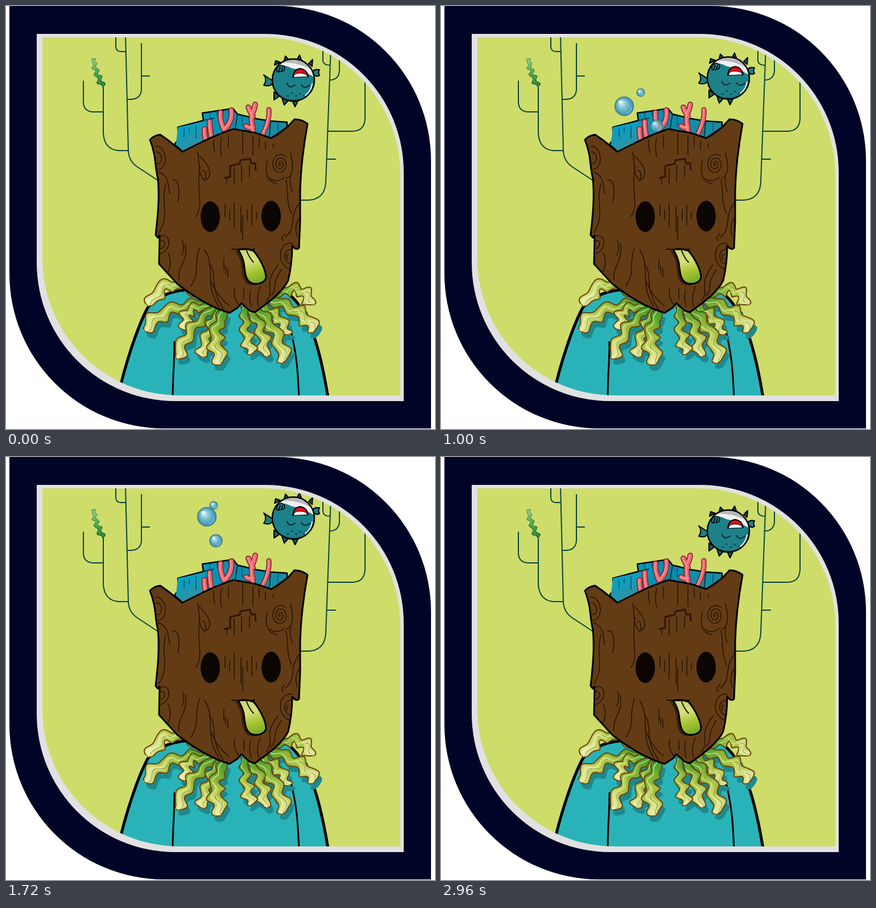
Animation, 754 px wide and 743 px high, one loop 3000 ms. Source, as an HTML page with a canvas:

```html
<!DOCTYPE html>
<html lang="en">
<head>
<meta charset="utf-8">
<title>Bark head and puffer fish</title>
<style>
html, body { margin: 0; width: 100%; height: 100%; overflow: hidden; background: #fff; }
canvas { display: block; }
</style>
</head>
<body>
<canvas id="stage" width="754" height="743"></canvas>
<script>
const stage = document.getElementById('stage');
let c = stage.getContext('2d');
const LOOP = 3000, STEP = 40;

function shape(d, fill, line, width = 1.5) {
  const p = typeof d === 'string' ? new Path2D(d) : d;
  if (fill) { c.fillStyle = fill; c.fill(p); }
  if (line) { c.strokeStyle = line; c.lineWidth = width; c.stroke(p); }
}

function oval(x, y, rx, ry, fill, line, width) {
  const p = new Path2D();
  p.ellipse(x, y, rx, ry, 0, 0, 7);
  shape(p, fill, line, width);
}

function ramp(x0, y0, x1, y1, ...colors) {
  const g = c.createLinearGradient(x0, y0, x1, y1);
  colors.forEach((k, i) => g.addColorStop(i / (colors.length - 1), k));
  return g;
}

function leafBox(x, y, w, h, r) {
  const p = new Path2D();
  p.roundRect(x, y, w, h, [0, r, 0, r]);
  return p;
}
const inner = leafBox(64, 55, 629, 629, 241);

// A wavy ribbon along a quadratic curve, widening to a round tip.
function ribbon([x0, y0, cx, cy, x1, y1, w], phase, scale = 1, amp = 4.5, waves = 3.4) {
  const left = [], right = [], n = 60;
  for (let i = 0; i <= n; i++) {
    const u = i / n, v = 1 - u;
    const dx = v * (cx - x0) + u * (x1 - cx), dy = v * (cy - y0) + u * (y1 - cy);
    const len = Math.hypot(dx, dy), nx = -dy / len, ny = dx / len;
    const a = waves * 2 * Math.PI * u + phase;
    const wave = amp * Math.sin(a) * Math.min(1, u * 3);
    const cap = u > .88 ? Math.sqrt(Math.max(0, 1 - ((u - .88) / .12) ** 2)) : 1;
    const h = w / 2 * scale * (.6 + .4 * u + .12 * Math.cos(a * 1.5)) * cap;
    const x = v * v * x0 + 2 * u * v * cx + u * u * x1;
    const y = v * v * y0 + 2 * u * v * cy + u * u * y1;
    left.push([x + nx * (wave + h), y + ny * (wave + h)]);
    right.unshift([x + nx * (wave - h), y + ny * (wave - h)]);
  }
  return new Path2D('M' + left.concat(right).join('L') + 'Z');
}

const strands = [
  [360, 522, 282, 452, 253, 528, 23], [470, 510, 520, 478, 538, 526, 21],
  [360, 525, 280, 520, 243, 570, 24], [455, 515, 520, 528, 543, 571, 24],
  [360, 528, 305, 525, 318, 568, 20], [440, 525, 485, 540, 493, 578, 21],
  [370, 530, 318, 560, 301, 620, 21], [435, 528, 482, 565, 489, 627, 23],
  [375, 535, 352, 570, 346, 617, 22], [425, 530, 456, 565, 454, 616, 21],
  [420, 528, 418, 575, 432, 611, 20], [385, 535, 355, 580, 380, 628, 27]
];

function collar() {
  strands.forEach((s, i) => {
    c.save();
    c.translate(5, 10);
    if (s[5] > 560) shape(ribbon(s, i * 1.7), '#1d898d');
    c.restore();
  });
  strands.forEach((s, i) => {
    const ph = i * 1.7, [x0, y0, , , x1, y1] = s;
    shape(ribbon(s, ph), ramp(x0, y0, x1, y1, '#359b2e', '#75ad2c', '#adc443', '#dce28e'), '#68430f', 2);
    shape(ribbon(s, ph, .5), ramp(x0, y0, x1, y1, '#65ae3022', '#c7d760aa', '#edf0b6cc'));
    c.save();
    c.translate(3, 1);
    shape(ribbon(s, ph, .04), '#68832d');
    c.translate(-7, -1);
    shape(ribbon(s, ph + .2, .07), '#e9f0a7');
    c.restore();
  });
}

function backdrop() {
  shape(leafBox(6, 0, 741, 742, 272), '#000426');
  shape(leafBox(54, 49, 645, 645, 243), '#e1e1e1');
  shape(inner, '#cedc69');
  c.clip(inner);
  shape(`M193 50V72Q194 80 202 80H211 M210 50L215 255Q216 272 230 282L268 307
    M238 66V147Q237 163 220 164H213 M238 123H252 M136 132V170Q137 185 153 186H171
    M171 140V224Q173 252 198 254H215
    M557 70V96Q558 104 569 104 M571 70L562 310Q560 340 531 341H515
    M586 90V114Q585 129 570 130 M631 120V198Q630 220 608 220H566 M564 269H579`, null, '#08443f', 2);
  const weed = [154, 93, 156, 116, 171, 142, 9];
  shape(ribbon(weed, 0, 1, 2.5, 4), ramp(154, 93, 170, 140, '#a8d49b', '#43a14b', '#176c2e'), '#2d793c', 1);
  shape(ribbon(weed, 0, .3, 2.5, 4), '#73bd5e88');
}

function body() {
  shape('M194 700C208 630 232 562 249 530C270 505 300 498 330 498H485C522 518 548 570 568 700Z',
    '#29b3b8', '#000', 5);
  shape('M293 690C293 650 296 630 296 590M515 690C513 640 511 610 499 565', null, '#000', 3);
}

function coral(d, width = 7) {
  shape(d, null, '#78242e', width + 3);
  shape(d, null, '#ed6870', width);
  c.save();
  c.translate(-1, -1);
  shape(d, null, '#ff9998', 1.6);
  c.restore();
}

function hollow() {
  shape('M296 243L303 234L302 213L347 201L345 188L399 180L407 190L440 198L465 202L494 204V213L466 232L400 217L311 256Z',
    ramp(300, 200, 494, 220, '#00a5c9', '#078daf', '#1d8c9e'), '#000', 2.5);
  shape('M302 213L347 203L354 215L347 245L311 256L299 240Z', ramp(310, 210, 330, 250, '#00a2ca', '#34909d'));
  shape('M347 201L365 197M407 190L402 219M465 203L463 228', null, '#07343d', 2);
  shape('M313 216V230M322 214V222M358 188V196M371 185V194M382 184V188M391 182V187M334 210V233M415 195V211M478 206V220', null, '#08566b', 1.5);
  coral('M349 216Q348 222 352 242M358 203Q358 218 362 235');
  coral('M377 187Q375 199 383 217M396 183Q399 202 384 217');
  coral('M426 178Q430 188 434 194M438 173Q437 181 432 191Q431 204 434 220M422 211Q429 216 434 213');
  coral('M462 182Q464 200 451 226', 6);
}

function head() {
  shape(`M253 235Q260 227 271 226L284 235L310 256L342 240Q374 224 400 216L439 223L466 232L477 226L495 212L507 199
    Q520 199 530 207C523 245 518 285 517 325L517 378L515 425Q510 430 503 421C503 446 500 465 496 482
    C486 503 461 521 437 538L428 535L414 522L407 530L393 539C360 529 326 508 300 487L269 453
    L270 403L267 407L263 402C267 367 270 337 267 303C261 282 265 265 253 235Z`, '#633c15', '#000', 3);
  shape(`M263 246C285 246 286 290 264 287M264 256C276 256 277 278 265 277M281 312C271 350 289 365 269 398
    M268 291C288 299 284 315 288 330M293 306C304 302 306 325 302 344M337 257C342 285 336 293 350 308
    M340 263C359 281 364 298 351 305M341 282C333 330 349 345 334 370M345 288Q354 290 350 304
    M365 235Q364 246 367 257M379 231Q375 249 379 264M391 228V248M416 222V260M434 228V262M445 230V247
    M388 302V311M401 284V314M414 280V308M428 280V300M456 238V252M470 242V248
    M385 349V370M393 358V376M401 345V389M413 353V398M416 368V411M424 358V376M432 350V385M440 362V374
    M383 443V463M386 457V471M390 461V476
    M271 404C292 398 291 431 270 435M271 413C282 408 282 425 270 427
    M340 425C329 458 342 466 325 492M315 418C321 448 300 459 304 481M309 438Q315 424 310 412
    M285 434Q293 451 284 468M349 428C370 460 347 486 374 528M357 453C374 472 355 492 382 532
    M361 484Q371 510 392 526M402 496Q398 511 410 526M418 497V515M430 499Q426 512 431 528
    M503 417C478 412 474 455 500 463M504 428C485 424 486 452 501 453M497 437Q491 434 495 445
    M478 455C450 491 474 495 458 518M484 463C464 493 479 494 466 509M447 493Q439 511 444 529
    M492 305C497 327 492 345 502 365M500 298Q498 315 503 326M516 346C496 371 512 389 491 406
    M517 369Q505 387 512 404M490 400Q482 407 487 412M459 272Q452 308 476 312
    M493 302Q510 297 500 258M463 302Q476 312 489 301`, null, '#261204', 1.5);
  let spiral = 'M482 277';
  for (let a = 0; a < 18; a += .2) {
    spiral += `L${482 + Math.cos(a) * a * .83} ${278 + Math.sin(a) * a}`;
  }
  shape(spiral, null, '#261204', 1.4);
  shape('M384 302L394 300V281L411 277L412 271L429 268L431 277L438 276L439 288', null, '#351305', 3);
  for (const [x, y] of [[359, 370], [466, 369]]) oval(x, y, 17, 27, '#0c0603');
  const tongue = 'M408 428Q423 425 435 430C447 444 458 466 457 478Q452 489 436 488C420 486 420 467 418 451Q415 438 408 428Z';
  c.save();
  c.translate(-5, 2);
  shape(tongue, '#3c210b');
  c.restore();
  shape(tongue, ramp(420, 430, 440, 488, '#cad879', '#d4df79', '#a5c42f', '#78ab28'), '#000', 3);
  shape('M397 427Q417 429 437 427M423 430Q428 443 435 450', null, '#120b02', 2);
}

function fish(dy) {
  c.save();
  c.translate(0, dy);
  shape(`M472 104L474 96L482 99ZM489 96L491 88L497 94ZM512 93L516 86L519 94ZM532 101L539 94L538 106Z
    M471 151L471 165L481 158ZM485 162L489 174L497 165ZM503 166L508 177L515 163Z`, '#175f68', '#000', 2);
  shape('M470 132L453 121Q460 130 453 139Q463 143 470 135Z', '#207e86', '#000', 2);
  shape('M539 118Q539 110 551 112Q548 116 551 122Q544 126 539 118Z', '#207e86', '#000', 2);
  oval(505, 130, 37, 37, '#1d8189');
  c.save();
  c.beginPath();
  c.arc(505, 130, 37, 0, 7);
  c.clip();
  shape('M465 111Q486 99 501 109Q525 113 550 130V85H465Z', '#f0f0f0');
  shape('M465 104Q507 91 545 117V85H465Z', '#b9b9bb');
  shape('M468 143Q490 175 535 157L520 175H480Z', '#14707a');
  c.restore();
  oval(505, 130, 37, 37, null, '#000', 2.5);
  shape('M477 116Q472 108 484 104Q493 106 488 114ZM479 115L482 108M484 115L486 108', '#207e86', '#000', 1.7);
  shape('M504 125Q506 110 518 110Q529 112 531 124Q517 120 504 125Z', '#d7131b', '#000', 2);
  shape('M505 125Q507 117 517 118Q528 118 530 124Z', '#fff', '#000', 1);
  shape('M494 136Q497 146 508 139M519 138Q525 147 534 139', null, '#06272b', 2);
  for (const [x, y] of [[502, 153], [510, 158], [517, 154], [524, 157], [495, 158]]) oval(x, y, 2.5, 1.5, '#0b545d');
  shape('M538 137Q536 150 526 157', null, '#e3f2ee', 2);
  c.restore();
}

// Bubble keys: time, x, y.
const bubbles = [
  { r: 16.5, keys: [[0, 373, 264], [400, 354, 225], [1000, 322, 176], [1400, 329, 136], [1720, 353, 105], [2040, 352, 66], [2240, 345, 35]] },
  { r: 7, keys: [[0, 375, 247], [400, 371, 210], [1000, 351, 152], [1400, 340, 115], [1720, 365, 85], [2040, 375, 49], [2140, 375, 35]] },
  { r: 11, keys: [[600, 394, 250], [1000, 379, 211], [1400, 353, 181], [1720, 369, 147], [2040, 392, 116], [2680, 380, 42]] }
];

function along(keys, t) {
  const last = keys.length - 1;
  if (t < keys[0][0] || t > keys[last][0]) return null;
  const i = Math.max(0, keys.findIndex(k => k[0] >= t) - 1);
  const a = keys[i], b = keys[i + 1], span = b[0] - a[0], u = (t - a[0]) / span;
  const slope = (j, n) => {
    const p = keys[Math.max(0, j - 1)], q = keys[Math.min(last, j + 1)];
    return (q[n] - p[n]) / (q[0] - p[0]) * span;
  };
  return [1, 2].map(n => {
    const m = slope(i, n), k = slope(i + 1, n), d = b[n] - a[n];
    return a[n] + u * (m + u * (3 * d - 2 * m - k + u * (m + k - 2 * d)));
  });
}

function bubble({ r, keys }, t) {
  const at = along(keys, t);
  if (!at) return;
  const [x, y] = at;
  const g = c.createRadialGradient(x - r * .35, y - r * .4, r * .05, x, y, r);
  g.addColorStop(0, '#dff4f5');
  g.addColorStop(.35, '#8acbd9');
  g.addColorStop(1, '#328daf');
  c.save();
  c.globalAlpha = Math.min(1, .45 + (t - keys[0][0]) / 1100);
  oval(x, y, r, r, g, '#506f72', 1.2);
  oval(x - r * .4, y - r * .45, r * .22, r * .15, '#f2ffffcc');
  const glint = new Path2D();
  glint.arc(x, y, r * .8, .2, 1.3);
  shape(glint, null, '#b5e6ec99', 1.3);
  c.restore();
}

function layer(...parts) {
  const cv = document.createElement('canvas'), main = c;
  cv.width = 754;
  cv.height = 743;
  c = cv.getContext('2d');
  c.lineJoin = c.lineCap = 'round';
  parts.forEach(f => f());
  c = main;
  return cv;
}
const back = layer(backdrop, body, hollow);
const front = layer(() => c.clip(inner), collar, head);
c.lineJoin = c.lineCap = 'round';

function draw(now) {
  const t = Math.floor(now % LOOP / STEP) * STEP;
  const lift = t > 800 && t < 2400 ? -12 * (1 - Math.cos((t - 800) / 800 * Math.PI)) : 0;
  c.clearRect(0, 0, 754, 743);
  c.drawImage(back, 0, 0);
  c.save();
  c.clip(inner);
  bubbles.forEach(b => bubble(b, t));
  fish(lift);
  c.restore();
  c.drawImage(front, 0, 0);
  requestAnimationFrame(draw);
}
draw(performance.now());
</script>
</body>
</html>
```
